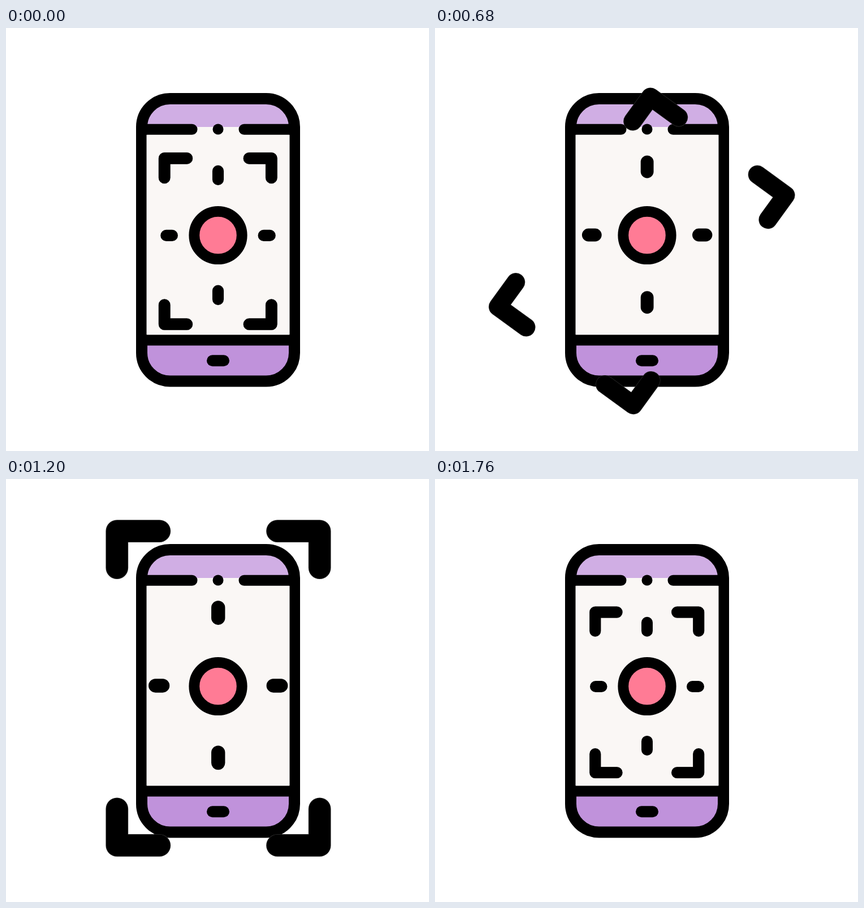
An HTML page that plays this animation: 748x748 px, repeating every 1.8 s.

```html
<!DOCTYPE html>
<html lang="en">
<head>
<meta charset="utf-8">
<title>Phone camera focus</title>
<style>
html, body { margin: 0; width: 100%; height: 100%; overflow: hidden; background: #fff; }
svg { display: block; width: 100vw; height: 100vh; }
.line { fill: none; stroke: #000; stroke-width: 20; stroke-linecap: round; stroke-linejoin: round; }
</style>
</head>
<body>
<svg viewBox="0 0 748 748">
  <defs>
    <path id="corners" d="M283.3 268.7V235.5H321.6 M428.1 235.5H466.2V268.7
      M466.2 486.2V519.2H428.1 M321.6 519.2H283.3V486.2"/>
    <clipPath id="body"><rect x="240" y="125" width="270" height="500" rx="50"/></clipPath>
  </defs>

  <g clip-path="url(#body)">
    <path fill="#d0aee4" d="M240 125H510V180H240Z"/>
    <path fill="#c092db" d="M240 550H510V625H240Z"/>
  </g>
  <rect class="line" x="240" y="125" width="270" height="499.5" rx="50"/>
  <rect x="248.5" y="188" width="253" height="355" rx="1.5" fill="#faf7f5"/>
  <path fill="#faf7f5" d="M330 175H420V190H330Z"/>
  <path class="line" style="stroke-width:19" d="M240 179.2H329 M421 179.2H510 M240 552H510"/>
  <circle cx="375" cy="179" r="9.5"/>
  <path class="line" d="M365 588.2H385"/>
  <circle cx="375" cy="366.5" r="42.2" fill="#ff7b95" stroke="#000" stroke-width="18.8"/>

  <path id="ticks" class="line" d="M375 253.8V268.8 M375 463.9V479 M284 367H294.5 M455 367H466"/>
  <g id="focus">
    <use href="#corners" class="line" style="stroke:#333;stroke-width:20.3"/>
    <use href="#corners" class="line" style="stroke-width:19.5"/>
  </g>
</svg>
<script>
const ticks = document.getElementById('ticks');
const focus = document.getElementById('focus');
const STEP = 40, STEPS = 45;

function pose(el, x, y, scale, angle) {
  el.setAttribute('transform',
    `translate(${x} ${y}) rotate(${angle}) scale(${scale}) translate(${-x} ${-y})`);
}

const start = performance.now();

function draw() {
  const n = Math.floor((performance.now() - start) / STEP) % STEPS;
  // Grow over 30 steps, shrink over 15; two turns in the second half of the growth.
  const zoom = n < 30 ? (n + 1) / 30 : (44 - n) / 15;
  const angle = n > 14 && n < 29 ? -48 * (n - 14) : 0;
  pose(ticks, 374, 374, 1 + 0.235 * zoom, 0);
  pose(focus, 374, 385, 1 + 1.028 * zoom, angle);
  requestAnimationFrame(draw);
}
draw();
</script>
</body>
</html>
```
